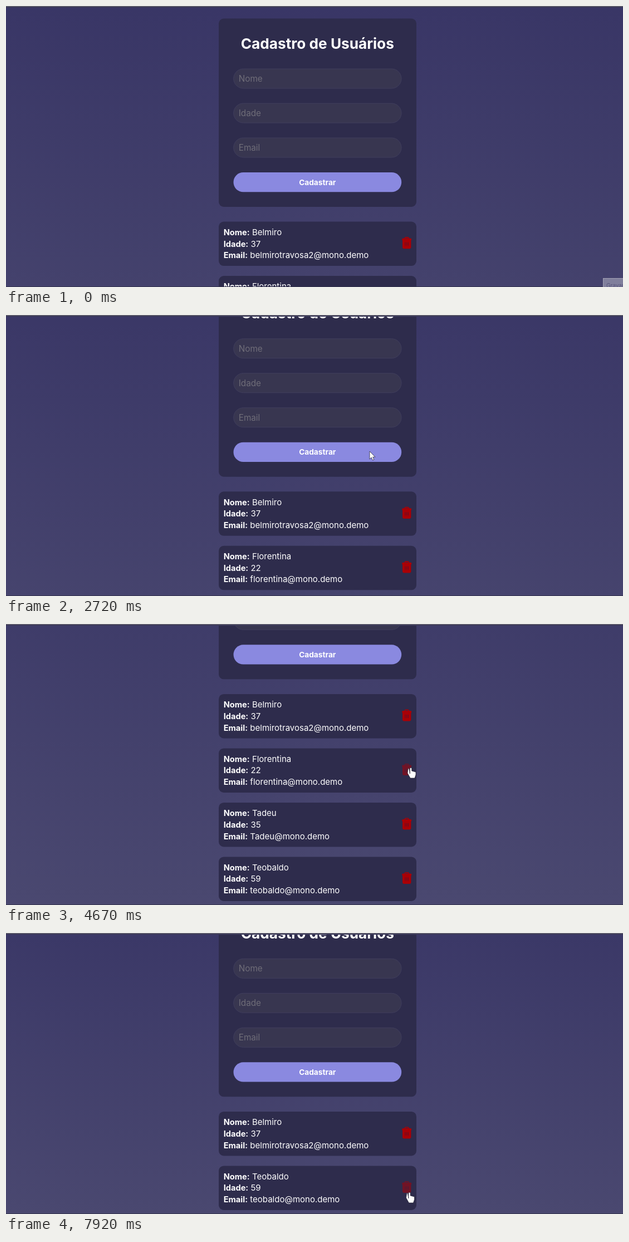
Write an HTML page that moves like this. It is 1108 px wide and 505 px high and loops after 7990 ms.

```html
<!DOCTYPE html>
<html lang="pt">
<head>
<meta charset="utf-8">
<title>Cadastro</title>
<style>
  html, body { margin: 0; width: 100%; height: 100%; overflow: hidden; background: #3c3969; }
  svg { display: block; width: 1108px; height: 505px; font-family: Inter, "Open Sans", sans-serif; }
  text { white-space: pre; }
  .panel { fill: #2e2c4c; }
  .label, .title, .button { font-weight: 700; fill: #fff; }
  .title { font-size: 26.2px; text-anchor: middle; }
  .button { font-size: 13.7px; text-anchor: middle; }
  .hint { font-size: 15.3px; fill: #6f6d78; }
  .field { fill: #383650; stroke: #403e5d; }
  .line { font-size: 15px; fill: #fff; }
  .label { font-size: 14.6px; }
  .bin { fill: #a90006; }
  .bin path { fill: none; stroke: #5c1029; }
  .bin .handle { fill: none; stroke: #a90006; stroke-width: 1.6; }
</style>
</head>
<body>
<svg viewBox="0 0 1108 505">
  <defs>
    <linearGradient id="sky" x2="0" y2="1">
      <stop stop-color="#393666"/>
      <stop offset="1" stop-color="#4a4870"/>
    </linearGradient>
  </defs>
  <g id="page">
    <rect id="backdrop" width="1108" fill="url(#sky)"/>
    <rect class="panel" x="382" y="22.5" width="355" height="338.5" rx="9"/>
    <text class="title" x="559.3" y="76.5">Cadastro de Usuários</text>
    <g id="fields"></g>
    <rect x="408.5" y="299" width="301.7" height="35.3" rx="17.6" fill="#8a89e0"/>
    <text class="button" x="559.3" y="321.6">Cadastrar</text>
    <g id="cards"></g>
  </g>
  <path d="M0 1.5H1108" stroke="#3d3b5b" stroke-width="3"/>
  <path d="M0 .5H1108" stroke="#75747a"/>
  <path d="M0 504.5H1108" stroke="#36354f"/>
  <g id="toast">
    <rect x="1072.5" y="489.5" width="40" height="20" fill="#807f9c" stroke="#a2a1b3"/>
    <text x="1078" y="506" font-size="10" fill="#56547a">Gravando</text>
  </g>
  <g id="cursor" fill="#fff" stroke="#1c1b2b" stroke-width=".7" stroke-linejoin="round">
    <path id="arrow" d="M0 0V14L3.2 11L5.4 16L7.8 15L5.7 10.2H10Z"/>
    <path id="hand" d="M-1.7 1.6Q0-1.4 1.7 1.6V6L9 8V13L7 19H-1L-6 10Q-4-8.5-1.7 11Z"/>
  </g>
</svg>
<script>
const LOOP = 7990, PITCH = 97.5, FIRST_CARD = 387.6, PAGE_HEIGHT = 767;
const $ = id => document.getElementById(id);

const users = [
  { name: "Belmiro", age: 37, email: "belmirotravosa2@mono.demo" },
  { name: "Florentina", age: 22, email: "florentina@mono.demo", removed: 5290 },
  { name: "Tadeu", age: 35, email: "Tadeu@mono.demo", removed: 6680 },
  { name: "Teobaldo", age: 59, email: "teobaldo@mono.demo" }
];

// Pointer strokes; a swing bows the stroke sideways at its middle.
const entry = { x: 988, y: 496 };
const strokes = [
  { start: 270, end: 430, x: 856, y: 472 },
  { start: 900, end: 1710, x: 699, y: 100, swing: [-75, 0] },
  { start: 1710, end: 2380, x: 634, y: 230, swing: [-250, -90] },
  { start: 2520, end: 2580, x: 653, y: 245 },
  { start: 3460, end: 4260, x: 635, y: 272, swing: [-137, 0] },
  { start: 4260, end: 4660, x: 727, y: 258 },
  { start: 5820, end: 6070, x: 710, y: 367, swing: [-15, 0] },
  { start: 6240, end: 6610, x: 721, y: 360 },
  { start: 7020, end: 7850, x: 729.5, y: 462 },
  { start: 7890, end: 7915, x: 724.5, y: 466 }
];

const progress = (time, start, end) => Math.min(1, Math.max(0, (time - start) / (end - start)));
const smooth = p => p * p * (3 - 2 * p);

function pointerAt(time) {
  let { x, y } = entry;
  for (const stroke of strokes) {
    if (time < stroke.start) break;
    const p = smooth(progress(time, stroke.start, stroke.end));
    const [sx, sy] = stroke.swing || [0, 0];
    const bow = Math.sin(Math.PI * p);
    x += (stroke.x - x) * p + sx * bow;
    y += (stroke.y - y) * p + sy * bow;
  }
  return [x, y];
}

// The wheel scroll advances in eight accelerating steps.
function wheelScroll(time) {
  const step = Math.floor(progress(time + 10, 2540, 2980) * 8);
  return 261.7 * (step / 8) ** 1.34;
}

const show = (node, visible) => node.setAttribute("visibility", visible ? "visible" : "hidden");
const move = (node, x, y) => node.setAttribute("transform", `translate(${x} ${y})`);

const line = (label, value, y) =>
  `<text class="line" x="390.7" y="${y}"><tspan class="label">${label}:</tspan> ${value}</text>`;

const bin = `<g class="bin">
  <rect class="handle" x="716.3" y="28.3" width="6.8" height="5" rx="1.5"/>
  <rect x="711.2" y="30" width="17" height="4" rx="1.5"/>
  <rect x="712" y="32" width="15.4" height="16.6" rx="3"/>
  <path d="M717 37V43M719.7 37V43M722.4 37V43"/>
</g>`;

$("fields").innerHTML = ["Nome", "Idade", "Email"].map((hint, i) => {
  const y = 113 + i * 62;
  return `<rect class="field" x="408.7" y="${y}" width="301.3" height="35" rx="17.5"/>
    <text class="hint" x="417.7" y="${y + 23.2}">${hint}</text>`;
}).join("");

$("cards").innerHTML = users.map(({ name, age, email }) => `<g>
  <rect class="panel" x="382" width="355" height="79.5" rx="9"/>
  ${line("Nome", name, 24.4)}${line("Idade", age, 45)}${line("Email", email, 65.7)}${bin}
</g>`).join("");

const cards = [...$("cards").children];
const bins = cards.map(card => card.querySelector(".bin"));

function draw(time) {
  const [x, y] = pointerAt(time);
  const gone = users.filter(user => time >= user.removed).length;
  const scroll = wheelScroll(time) - gone * PITCH;
  let row = 0, overBin = false;

  users.forEach((user, i) => {
    const present = !(time >= user.removed);
    show(cards[i], present);
    if (!present) return;
    const top = FIRST_CARD + PITCH * row++;
    move(cards[i], 0, top);
    const dy = y - (top - scroll);
    const hovered = x > 710.5 && x < 729 && dy > 27 && dy < 50;
    bins[i].setAttribute("opacity", hovered ? 0.55 : 1);
    overBin = overBin || hovered;
  });

  $("backdrop").setAttribute("height", PAGE_HEIGHT - gone * PITCH);
  move($("page"), 0, -scroll);
  move($("cursor"), x, y);
  show($("arrow"), time >= 290 && !overBin);
  show($("hand"), overBin);
  show($("toast"), time < 70);
}

const start = performance.now();
function tick() {
  draw((performance.now() - start) % LOOP);
  requestAnimationFrame(tick);
}
tick();
</script>
</body>
</html>
```
